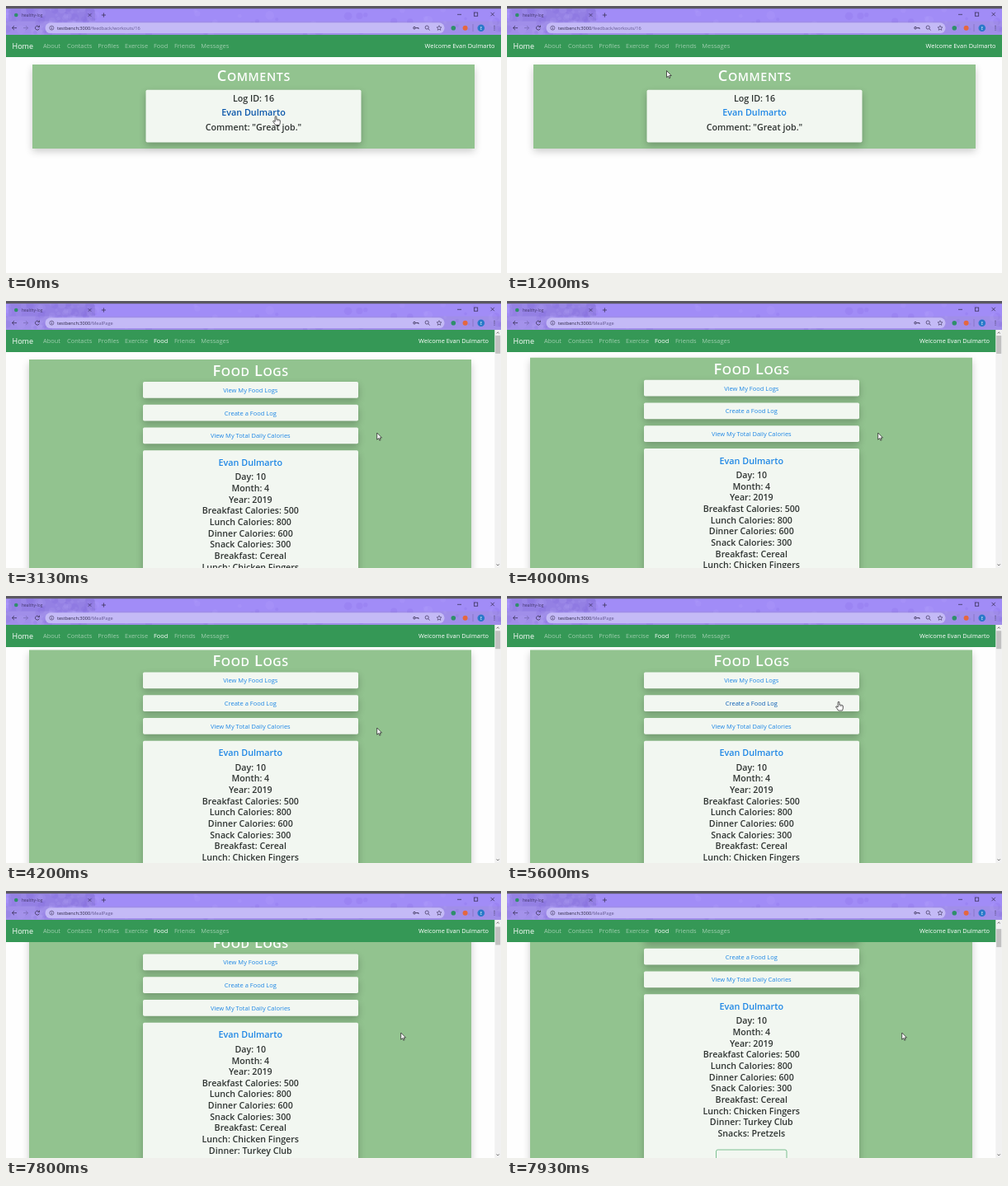
Write an HTML page with a canvas that moves like this. It is 600 px wide and 324 px high and loops after 8 s.

```html
<!DOCTYPE html>
<html lang="en">
<head>
<meta charset="utf-8">
<title>Food log walkthrough</title>
<style>
html, body { margin: 0; width: 100%; height: 100%; overflow: hidden; background: #fefefe; }
canvas { display: block; width: 100vw; height: 100vh; }
</style>
</head>
<body>
<canvas id="stage"></canvas>
<script>
const W = 600, H = 324, LOOP = 8000, FPS = 15, SWITCH = 2200;
const canvas = document.getElementById('stage');
const ctx = canvas.getContext('2d');
const ratio = window.devicePixelRatio || 1;
canvas.width = W * ratio;
canvas.height = H * ratio;

const FONT = '"Open Sans", "Noto Sans", sans-serif';
const USER = 'Evan Dulmarto';
const GREEN = '#359856', PANEL = '#92c38f', CARD = '#f2f7f1', INK = '#2f3432';
const LINK = [31, 135, 229], LINK_HOVER = [10, 86, 170];

// Pointer hotspot: time, x, y
const PATH = [
  [0, 327, 133.5], [200, 308, 131], [500, 256, 114], [860, 213, 96], [930, 211.5, 94.5],
  [1140, 211, 94], [1200, 193.5, 78.5], [1500, 186, 56], [2000, 187, 47], [2300, 188, 48],
  [2600, 300, 104], [2860, 420, 158], [2930, 438, 160], [3130, 449.7, 160], [4470, 449.7, 160],
  [4730, 440, 132], [4930, 420, 107], [5130, 404, 101], [5400, 403, 106], [5530, 402, 126],
  [5600, 402, 128], [5730, 402, 136], [5930, 403, 172], [6000, 403, 184], [6200, 405, 160],
  [6500, 407, 158], [7000, 401, 156], [7130, 404, 157], [7330, 446, 166], [7530, 478.7, 172],
  [8000, 478.7, 172]
];

const BUTTONS = ['View My Food Logs', 'Create a Food Log', 'View My Total Daily Calories'];
const FACTS = ['Day: 10', 'Month: 4', 'Year: 2019', 'Breakfast Calories: 500', 'Lunch Calories: 800',
  'Dinner Calories: 600', 'Snack Calories: 300', 'Breakfast: Cereal', 'Lunch: Chicken Fingers',
  'Dinner: Turkey Club', 'Snacks: Pretzels'];
const NAV = [['About', 45], ['Contacts', 74], ['Profiles', 111.3], ['Exercise', 144],
  ['Food', 179], ['Friends', 204], ['Messages', 236.3]];

const clamp = v => Math.max(0, Math.min(1, v));
const inside = (p, x, y, w, h) => p.x >= x && p.x <= x + w && p.y >= y && p.y <= y + h;
const buttonTop = i => 98 + i * 27.75;

function pointer(t) {
  let i = 1;
  while (i < PATH.length - 1 && PATH[i][0] < t) i++;
  const [t0, x0, y0] = PATH[i - 1], [t1, x1, y1] = PATH[i];
  const k = clamp((t - t0) / (t1 - t0));
  return { x: x0 + (x1 - x0) * k, y: y0 + (y1 - y0) * k };
}

function scrollAt(t) {
  const first = 1 - Math.pow(1 - clamp((t - 3940) / 260), 2);
  return 5.6 * first + 50.4 * clamp((t - 7740) / 190);
}

function hovered(t) {
  const p = pointer(t);
  if (inside(p, 177, 40, 22, 17)) return 'Food';
  if (t < SWITCH) return inside(p, 260, 124, 80, 13) ? USER : '';
  const y = scrollAt(t);
  return BUTTONS.find((b, i) => inside(p, 166, buttonTop(i) - y, 261, 20)) || '';
}

// Link colours fade over 150 ms
function hoverAmount(name, t) {
  let n = 0;
  for (let i = 0; i < 10; i++) if (hovered(Math.max(0, t - i * 15)) === name) n++;
  return n / 10;
}

function linkColor(name, t) {
  const k = hoverAmount(name, t);
  return `rgb(${LINK.map((c, i) => Math.round(c + (LINK_HOVER[i] - c) * k))})`;
}

function rect(x, y, w, h, fill, r = 0) {
  ctx.fillStyle = fill;
  ctx.beginPath();
  ctx.roundRect(x, y, w, h, r);
  ctx.fill();
}

function dot(x, y, r, fill) {
  ctx.fillStyle = fill;
  ctx.beginPath();
  ctx.arc(x, y, r, 0, 7);
  ctx.fill();
}

function line(color, width, ...pts) {
  ctx.strokeStyle = color;
  ctx.lineWidth = width;
  ctx.beginPath();
  for (let i = 0; i < pts.length; i += 2) ctx.lineTo(pts[i], pts[i + 1]);
  ctx.stroke();
}

function ring(x, y, r, color, width, from = 0, to = 7) {
  ctx.strokeStyle = color;
  ctx.lineWidth = width;
  ctx.beginPath();
  ctx.arc(x, y, r, from, to);
  ctx.stroke();
}

function text(s, x, y, size, fill, weight = 400, align = 'left') {
  ctx.font = `${weight} ${size}px ${FONT}`;
  ctx.textAlign = align;
  ctx.fillStyle = fill;
  ctx.fillText(s, x, y);
}

function shadowed(x, y, w, h, fill, r, alpha, blur, drop) {
  ctx.save();
  ctx.shadowColor = `rgba(0,0,0,${alpha})`;
  ctx.shadowBlur = blur * ratio;
  ctx.shadowOffsetY = drop * ratio;
  rect(x, y, w, h, fill, r);
  ctx.restore();
}

const panel = (x, y, h) => shadowed(x, y, 536, h, PANEL, 0, 0.2, 9, 3.5);
const card = (x, y, h) => shadowed(x, y, 261, h, CARD, 1.8, 0.24, 9, 3.5);

// Heading with large initials and small capitals
function heading(s, cx, y) {
  const gap = 0.6;
  const glyphs = [...s].map(c => {
    const size = c >= 'a' ? 14.3 : 18.2;
    ctx.font = `600 ${size}px ${FONT}`;
    const glyph = c.toUpperCase();
    return { glyph, size, w: ctx.measureText(glyph).width + gap };
  });
  let x = cx - glyphs.reduce((sum, g) => sum + g.w, -gap) / 2;
  for (const g of glyphs) {
    text(g.glyph, x, y, g.size, '#fff', 600);
    x += g.w;
  }
}

function commentsPage(t) {
  panel(32, 71, 102);
  heading('Comments', 300, 91);
  card(169.5, 101.8, 63.8);
  text('Log ID: 16', 300, 116.2, 10.7, INK, 600, 'center');
  text(USER, 300, 133.3, 10.8, linkColor(USER, t), 600, 'center');
  text('Comment: "Great job."', 300, 150.8, 10.7, INK, 600, 'center');
}

function foodPage(t) {
  const cx = 296.3;
  ctx.save();
  ctx.translate(0, -scrollAt(t));
  panel(28, 71, 500);
  heading('Food Logs', cx, 91);
  BUTTONS.forEach((label, i) => {
    const y = buttonTop(i);
    card(166, y, 19.8);
    text(label, cx, y + 12.9, 7.5, linkColor(label, t), 400, 'center');
  });
  card(166, 181.3, 260);
  text(USER, cx, 200, 10.8, linkColor(USER, t), 600, 'center');
  FACTS.forEach((fact, i) => text(fact, cx, 217.4 + i * 13.65, 10.65, INK, 600, 'center'));
  ctx.strokeStyle = '#5fb27a';
  ctx.lineWidth = 0.8;
  ctx.beginPath();
  ctx.roundRect(253.5, 370, 85.5, 25, 2);
  ctx.stroke();
  text('View Comments', cx, 385.6, 7.5, GREEN, 400, 'center');
  ctx.restore();
}

function scrollbar(t) {
  rect(592.3, 35, 7.7, 289, '#f1f1f1');
  rect(593.2, 41.8 + scrollAt(t) * 0.077, 6, 22, '#c1c1c1');
  line('#606060', 0.9, 594.6, 39.4, 596.2, 37.8, 597.8, 39.4);
  line('#606060', 0.9, 594.6, 319.4, 596.2, 321, 597.8, 319.4);
}

function navbar(t, food) {
  rect(0, 35, food ? 592.3 : W, 27, GREEN);
  text('Home', 7.5, 51.8, 9, '#fff', 500);
  for (const [label, x] of NAV) {
    const active = food && label === 'Food';
    const alpha = active ? 1 : 0.52 + 0.25 * hoverAmount(label, t);
    text(label, x, 51.4, 7.45, `rgba(255,255,255,${alpha})`, active ? 500 : 400);
  }
  text('Welcome ' + USER, food ? 585 : 592.5, 51.4, 7.4, '#fff', 400, 'right');
}

function mottle() {
  let seed = 11;
  const rnd = () => (seed = (seed * 16807) % 2147483647) / 2147483647;
  for (let i = 0; i < 110; i++) {
    const x = rnd() * (i % 2 ? 110 : W), y = 3 + rnd() * 32;
    dot(x, y, 1.5 + rnd() * 4, rnd() < 0.5 ? 'rgba(116,88,214,.13)' : 'rgba(196,180,255,.13)');
  }
}

function browser(food) {
  const ink = '#3b3358', dim = '#7a6bb4';
  ctx.save();
  ctx.beginPath();
  ctx.rect(0, 0, W, 35);
  ctx.clip();
  rect(0, 0, W, 35, '#a18cf7');
  rect(3, 4, 105, 15, '#9480e4', [3, 3, 0, 0]);
  rect(0, 18.5, W, 16.5, '#a08ee9');
  mottle();
  rect(0, 0, W, 3.2, '#5a5860');
  ctx.restore();

  dot(12.3, 11, 2.3, '#2f8f6b');
  text('healthy-log', 19, 13, 4.9, '#42376a');
  const cross = (x, y, r, w) => {
    line(ink, w, x - r, y - r, x + r, y + r);
    line(ink, w, x + r, y - r, x - r, y + r);
  };
  cross(101.5, 11, 1.8, 0.7);
  line(ink, 0.8, 115.8, 11, 121, 11);
  line(ink, 0.8, 118.4, 8.4, 118.4, 13.6);
  line(ink, 0.8, 547, 10.3, 552, 10.3);
  ctx.strokeRect(567.5, 8, 4.2, 4.2);
  cross(589.7, 10, 2.2, 0.8);

  line(ink, 0.8, 13, 26.6, 7.4, 26.6);
  line(ink, 0.8, 10, 24, 7.4, 26.6, 10, 29.2);
  line(dim, 0.8, 21, 26.6, 26.6, 26.6);
  line(dim, 0.8, 24, 24, 26.6, 26.6, 24, 29.2);
  ring(38, 26.6, 2.5, ink, 0.8, 0.4, 5.5);
  line(ink, 0.8, 40.5, 23.6, 40.5, 25.6, 38.5, 25.6);

  rect(47.5, 20.3, 484, 12.7, '#c4baf6', 6.3);
  ring(55.4, 26.6, 2.5, ink, 0.6);
  line(ink, 0.7, 55.4, 26.2, 55.4, 28.2);
  line(ink, 0.7, 55.4, 24.9, 55.4, 25.5);
  const host = 'testbench:3000';
  text(host, 62, 28.6, 5.6, '#2b2545');
  const path = food ? '/MealPage' : '/feedback/workouts/16';
  text(path, 62 + ctx.measureText(host).width, 28.6, 5.6, '#625890');

  ring(495, 26.6, 1.3, ink, 0.9);
  line(ink, 0.9, 496.3, 26.6, 500, 26.6, 500, 28);
  ring(510.2, 26, 2.1, ink, 0.7);
  line(ink, 0.8, 511.7, 27.5, 513.6, 29.4);
  const star = [];
  for (let i = 0; i <= 10; i++) {
    const r = i % 2 ? 1.4 : 3.1, a = i * Math.PI / 5 - Math.PI / 2;
    star.push(525 + r * Math.cos(a), 26.8 + r * Math.sin(a));
  }
  line(ink, 0.6, ...star);
  dot(542.3, 26.7, 2.8, '#2f8f6b');
  dot(556.6, 26.7, 3, '#e5673f');
  line(dim, 0.6, 566, 22, 566, 31);
  dot(575.8, 26.7, 4.3, '#2979c9');
  text('E', 575.8, 28.6, 5, '#d7e9fb', 400, 'center');
  for (const y of [24.4, 26.7, 29]) dot(592, y, 0.6, ink);
}

const ARROW = new Path2D('M0 0V8.2L1.9 6.5L3.1 9.2L4.4 8.6L3.2 6H5.8Z');
const HAND = new Path2D('M-.9 .8Q0-.6.9 .8V4Q1.9 3.4 2.5 4.3Q3.4 3.8 4 4.7Q5.1 4.4 5.3 5.6V8Q5.2 9.3 4.4 11H-.4Q-1.6 8.8-3.2 7Q-3.6 5.6-2.2 5.9L-.9 7Z');

function drawPointer(t) {
  const { x, y } = pointer(t);
  const hand = hovered(t) !== '';
  const shape = hand ? HAND : ARROW;
  ctx.save();
  ctx.translate(x, y);
  ctx.lineJoin = 'round';
  ctx.lineWidth = 0.75;
  ctx.fillStyle = '#fff';
  ctx.strokeStyle = '#222';
  ctx.fill(shape);
  ctx.stroke(shape);
  if (hand) {
    line('#444', 0.5, 0.9, 4, 0.9, 6);
    line('#444', 0.5, 2.5, 4.5, 2.5, 6.2);
    line('#444', 0.5, 4, 4.9, 4, 6.4);
  }
  ctx.restore();
}

function draw(t) {
  const food = t >= SWITCH;
  ctx.setTransform(canvas.width / W, 0, 0, canvas.height / H, 0, 0);
  rect(0, 0, W, H, '#fefefe');
  if (food) {
    foodPage(t);
    scrollbar(t);
  } else {
    commentsPage(t);
  }
  navbar(t, food);
  browser(food);
  drawPointer(t);
}

const start = performance.now();
function tick() {
  const t = (performance.now() - start) % LOOP;
  draw(Math.floor((t + 7) * FPS / 1000) % (LOOP * FPS / 1000) * 1000 / FPS);
  requestAnimationFrame(tick);
}
tick();
</script>
</body>
</html>
```
